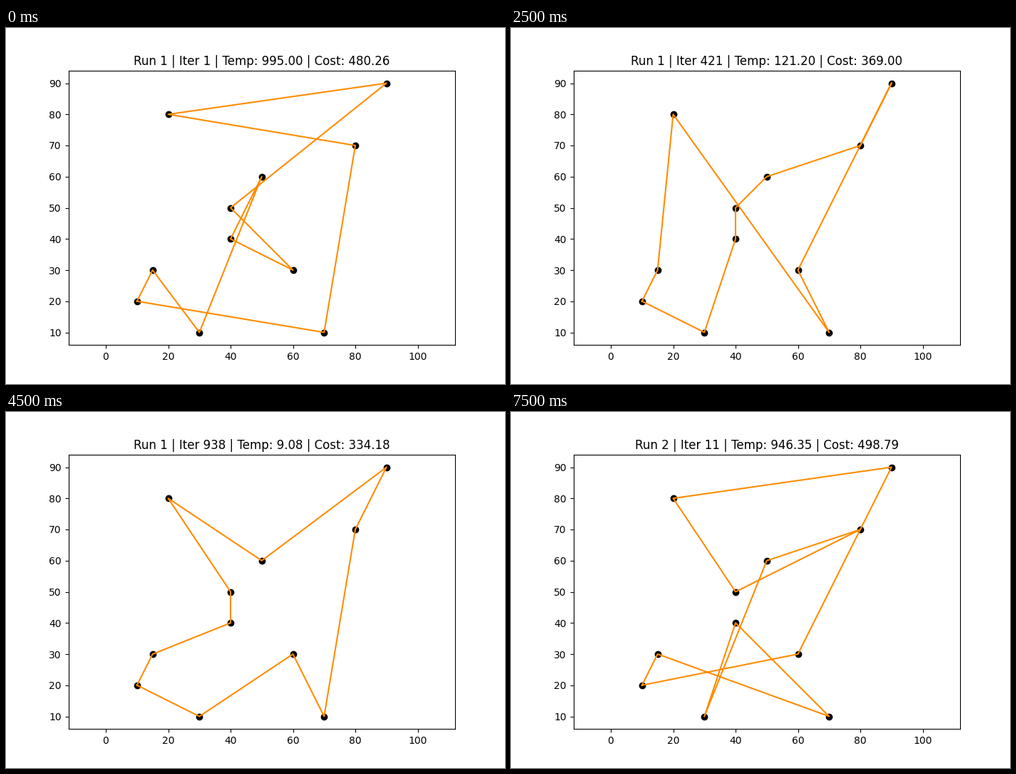
Animation, 700 px wide and 500 px high, one loop 8000 ms. Source, as a matplotlib script:

```python
import matplotlib.pyplot as plt
import numpy as np
from matplotlib.animation import FuncAnimation

START_TEMP, COOLING = 1000, 0.995

CITIES = dict(
    A=(10, 20), B=(15, 30), C=(20, 80), D=(30, 10), E=(40, 40), F=(40, 50),
    G=(50, 60), H=(60, 30), I=(70, 10), J=(80, 70), K=(90, 90),
)

# (run, iteration, best tour so far)
STEPS = [
    (1, 1, "AIJCKFHEGDB"),
    (1, 12, "ABDIJCKFHEG"),
    (1, 48, "AIJKCFHEGDB"),
    (1, 115, "AIJKGFCHEDB"),
    (1, 246, "AEHCFGKJIDB"),
    (1, 421, "ADEFGJKHICB"),
    (1, 517, "ABDEGFCKJHI"),
    (1, 594, "ABEGKJCFHID"),
    (1, 628, "ABEGJKCFHID"),
    (1, 938, "ABEFCGKJIHD"),
    (1, 967, "ABEFGCKJIHD"),
    (1, 1055, "ABEFGCKJHID"),
    (2, 0, "ADCIKHEJFGB"),
    (2, 1, "ADCIKHJEFGB"),
    (2, 10, "AHJCFKGDEIB"),
    (2, 11, "AHKCFJGDEIB"),
]


def closed_path(tour):
    return np.array([CITIES[c] for c in tour + tour[0]], dtype=float)


def length(path):
    return np.hypot(*np.diff(path, axis=0).T).sum()


fig, ax = plt.subplots(figsize=(7, 5), dpi=100)
ax.scatter(*zip(*CITIES.values()), color="black")
route, = ax.plot([], [], color="darkorange", lw=1.5)
ax.set(xlim=(-12, 112), ylim=(6, 94),
       xticks=range(0, 101, 20), yticks=range(10, 91, 10))
title = ax.set_title("")


def update(i):
    run, step, tour = STEPS[i]
    path = closed_path(tour)
    temp = START_TEMP * COOLING ** step
    route.set_data(*path.T)
    title.set_text(f"Run {run} | Iter {step} | Temp: {temp:.2f} | "
                   f"Cost: {length(path):.2f}")
    return route, title


anim = FuncAnimation(fig, update, frames=len(STEPS), interval=500,
                     repeat=True, repeat_delay=0, blit=False)
plt.show()
```
